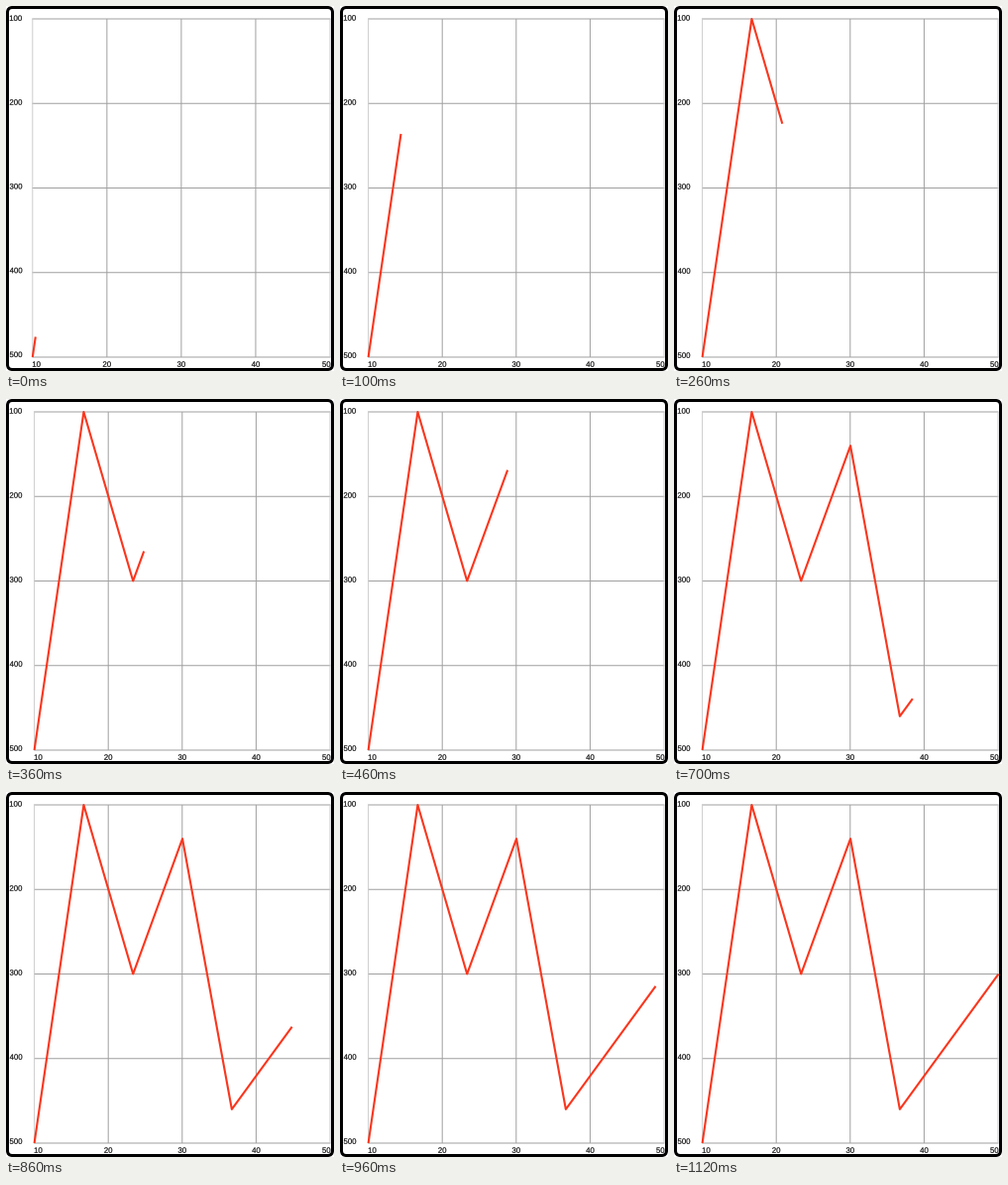
These frames come from a looping animation (331 px wide and 368 px high, 1140 ms). A matplotlib script:

```python
import numpy as np
import matplotlib.pyplot as plt
from matplotlib.animation import FuncAnimation
from matplotlib.patches import FancyBboxPatch, PathPatch
from matplotlib.textpath import TextPath
from matplotlib.transforms import Affine2D

W, H, DPI = 331, 368, 100
PX = 72 / DPI  # points per pixel
STEP, FRAMES = 20, 57
DRAW_MS = 1000
TOP, BOTTOM, RIGHT = 13.0, 354.0, 327.5
RED, GRID, EDGE = "#fa361d", "#a0a0a0", "#cccccc"
FONT = {"family": "Liberation Sans", "size": 7.8}
TICKS = np.array([10, 20, 30, 40, 50])
VALUES = np.array([100, 200, 300, 400, 500])
DATA_X = np.array([0, 1, 2, 3, 4, 6]) / 6
DATA_Y = np.array([500, 100, 300, 140, 460, 300])

fig = plt.figure(figsize=(W / DPI, H / DPI), dpi=DPI, facecolor="white")
ax = fig.add_axes([0, 0, 1, 1])
ax.set_xlim(0, W)
ax.set_ylim(H, 0)
ax.axis("off")


def to_y(value):
    return TOP + (value - 100) / 400 * (BOTTOM - TOP)


def label(text):
    """Text as outlines, so it can sit between whole pixels."""
    path = TextPath((0, 0), str(text), prop=FONT)
    patch = PathPatch(path, fc="#111111", ec="#111111", lw=0.2 * PX,
                      snap=False, zorder=4)
    return ax.add_patch(patch)


def place(patch, x, y, centred=False):
    box = patch.get_path().get_extents()
    dx = (box.x0 + box.x1) / 2 if centred else box.x0
    move = Affine2D().translate(-dx, 0).scale(1, -1).translate(x, y)
    patch.set_transform(move + ax.transData)


def rule(xs, ys, color=GRID):
    return ax.plot(xs, ys, color=color, lw=PX, solid_capstyle="butt",
                   snap=False, zorder=1)[0]


rows = [rule([0, RIGHT], [to_y(v)] * 2) for v in VALUES]
columns = [rule([0, 0], [TOP, BOTTOM], EDGE if t in (10, 50) else GRID)
           for t in TICKS]
row_labels = [label(v) for v in VALUES]
column_labels = [label(t) for t in TICKS]

curve, = ax.plot([], [], color=RED, lw=2.1 * PX, solid_capstyle="butt",
                 solid_joinstyle="round", snap=False, zorder=3)

ax.add_patch(FancyBboxPatch(
    (1.5, 1.5), W - 3, H - 3, boxstyle="round,pad=0,rounding_size=5",
    fc="none", ec="black", lw=3 * PX, zorder=5))


def lay_out(left, first_base, last_base):
    for row in rows:
        row.set_xdata([left - 0.5, RIGHT])
    xs = np.linspace(left, RIGHT - 0.5, len(TICKS))
    for column, x in zip(columns, xs):
        column.set_xdata([x, x])
    bases = np.linspace(first_base, last_base, len(VALUES))
    for text, y in zip(row_labels, bases):
        place(text, 3.8, y)
    for text, x in zip(column_labels, [left + 4, *xs[1:-1], 323.3]):
        place(text, x, 363.8, centred=True)


def update(i):
    # The plot area settles after its first layout pass.
    if i == 0:
        left = 26.8
        lay_out(left, 14.9, 354.0)
    else:
        left = 28.6
        lay_out(left, 14.6, 354.8)
    done = min((i * STEP + 10) / DRAW_MS, 1)
    seen = DATA_X < done
    u = np.append(DATA_X[seen], done)
    v = np.append(DATA_Y[seen], np.interp(done, DATA_X, DATA_Y))
    curve.set_data(left + u * (RIGHT - left), to_y(v))
    return [curve, *rows, *columns, *row_labels, *column_labels]


anim = FuncAnimation(fig, update, frames=FRAMES, interval=STEP,
                     repeat=True, repeat_delay=0, blit=False)
plt.show()
```
